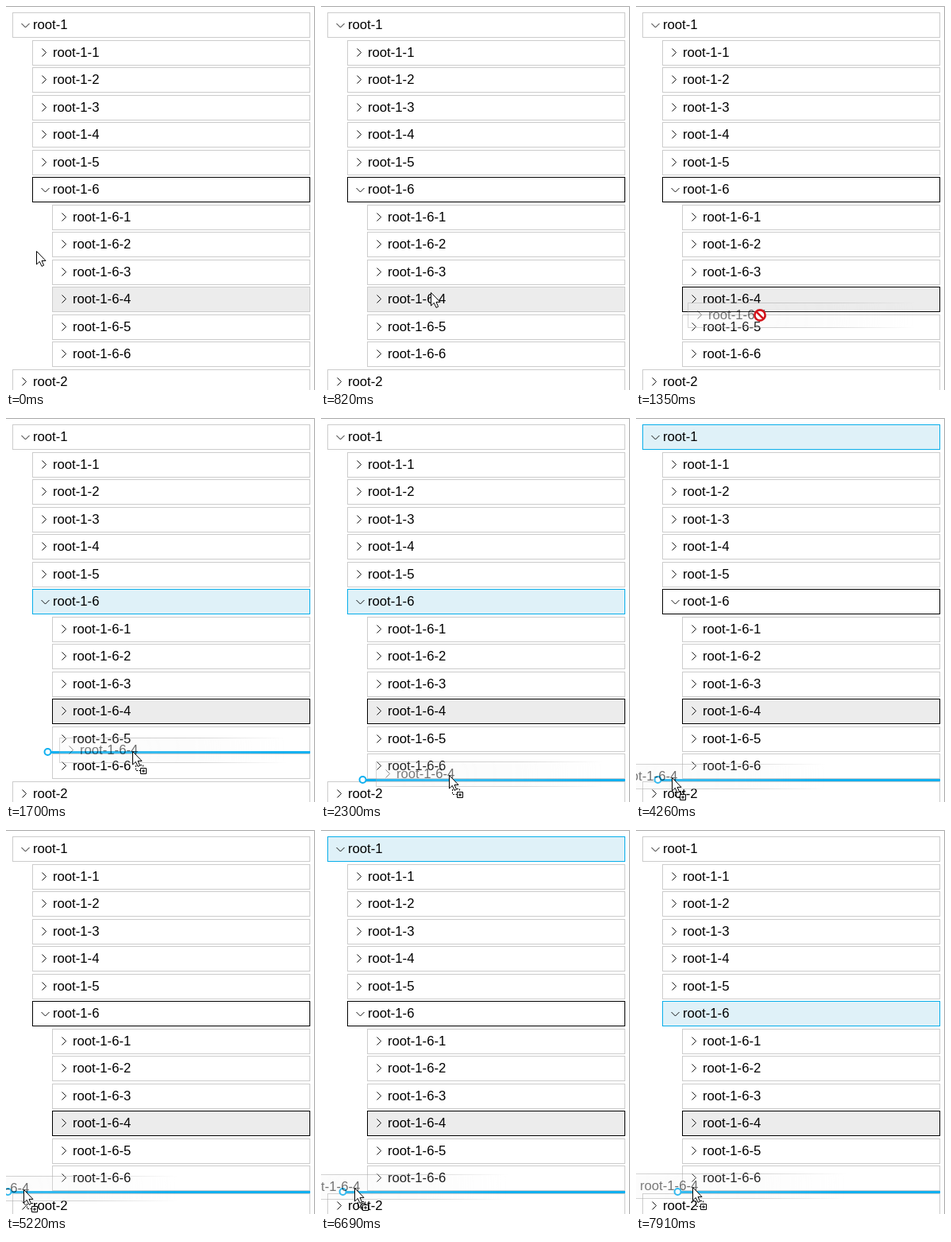
An HTML page that plays this animation: 389 by 483 pixels, repeating every 8 s.

```html
<!DOCTYPE html>
<html lang="en">
<head>
<meta charset="utf-8">
<title>Tree drag and drop</title>
<style>
  html, body { margin: 0; width: 100%; height: 100%; overflow: hidden; background: #fff; }
  svg { display: block; width: 389px; height: 483px; }
  text { font: 16.7px "Liberation Sans", Arial, sans-serif; fill: #000; }
  .row rect { fill: #fff; stroke: #ccc; }
  .row path { fill: none; stroke: #111; }
  .row.picked rect { fill: #ececec; }
  .row.focus rect { stroke: #000; }
  .row.over rect { fill: #dff1f8; stroke: #08aeea; }
  #ghost rect { fill: #ececec; fill-opacity: .3; stroke: #aaa; }
</style>
</head>
<body>
<svg viewBox="0 0 389 483">
  <defs>
    <radialGradient id="fade" gradientUnits="userSpaceOnUse" cx="92" cy="17" r="195">
      <stop offset="0" stop-color="#fff" stop-opacity=".58"/>
      <stop offset=".45" stop-color="#fff" stop-opacity=".48"/>
      <stop offset="1" stop-color="#fff" stop-opacity="0"/>
    </radialGradient>
    <mask id="soft" maskUnits="userSpaceOnUse" x="-5" y="-5" width="340" height="45">
      <rect x="-5" y="-5" width="340" height="45" fill="url(#fade)"/>
    </mask>
  </defs>
  <path d="M0 .5H388.5V483" fill="none" stroke="#a8a8a8"/>
  <g id="tree"></g>
  <g id="drop" stroke="#10b0f0">
    <path id="bar" stroke-width="3"/>
    <circle id="knob" r="4" fill="#fff" stroke-width="2"/>
  </g>
  <g id="ghost" mask="url(#soft)"></g>
  <g id="cursor">
    <g id="arrow">
      <path d="M.5 .5V17L4.3 13.4L7 19.4L9.6 18.2L7 12.4H12Z" fill="#fff" stroke="#000"/>
      <g id="badge" fill="none" stroke="#000">
        <path d="M4.5 18V24.5H10M10 17.5H13.5V20" stroke-dasharray="2 1.5"/>
        <path d="M10.5 21.5H17.5V28.5H10.5Z" fill="#fff"/>
        <path d="M12 25H16M14 23V27"/>
      </g>
    </g>
    <g id="deny" fill="#fff" stroke="#d4141c" stroke-width="2.6">
      <circle cx="-1" cy="-1" r="6.6"/>
      <path d="M-5.6 -5.6L3.6 3.6"/>
    </g>
  </g>
</svg>
<script>
const $ = id => document.getElementById(id);
const LOOP = 8000, PRESS = 870, DRAG = 1110, EDGE = 2300;

const children = parent => [1, 2, 3, 4, 5, 6].map(n => `${parent}-${n}`);
const names = ['root-1', ...children('root-1'), ...children('root-1-6'), 'root-2'];
const open = ['root-1', 'root-1-6'];
const dragged = 'root-1-6-4';

function row(name, x, y) {
  const chevron = open.includes(name) ? 'm11.5 14l5 5l5-5' : 'm12.5 10.5l5 5l-5 5';
  return `<g class="row" data-name="${name}">
    <rect x="${x + .5}" y="${y + .5}" width="${382 - x}" height="31"/>
    <path d="M${x} ${y}${chevron}"/>
    <text x="${x + 26}" y="${y + 21}">${name}</text></g>`;
}

$('tree').innerHTML = names.map((name, i) =>
  row(name, 8 + 25 * (name.split('-').length - 2), Math.round(8 + 34.5 * i))).join('');
$('ghost').innerHTML = row(dragged, 0, 0);
$('ghost').querySelector('rect').setAttribute('width', 324);
const rows = [...$('tree').children];

// Pointer moves: start, end, x, y; it rests in between
const moves = [
  [180, 930, 155, 369], [DRAG, 2050, 161, 449], [2600, 3430, 71, 452], [3430, 4070, 45, 452],
  [4260, 5220, 22, 452], [6090, 6690, 42, 450], [7370, 7910, 71, 449]
];

function pointer(t) {
  let x = 38, y = 308;
  for (const [start, end, toX, toY] of moves) {
    const k = Math.min(1, Math.max(0, (t - start) / (end - start)));
    x += (toX - x) * k;
    y += (toY - y) * k;
  }
  return [Math.round(x), Math.round(y)];
}

// Which row is highlighted, and where the insertion line lies
function target(t, x, y) {
  if (t < DRAG) return {};
  if (t >= EDGE) {
    if (x >= 58) return { over: 'root-1-6', knob: 52, y: 455.5 };
    if (x >= 33) return { over: 'root-1', knob: 27, y: 455.5 };
    return { knob: 2, y: 455.5 };
  }
  if (y < 395) return { denied: true };
  if (y < 412) return { over: 'root-1-6-5' };
  if (y < 428) return { over: 'root-1-6', knob: 52, y: 420.5 };
  return { over: 'root-1-6-6' };
}

const show = (id, on) => $(id).style.display = on ? '' : 'none';
const move = (id, x, y) => $(id).setAttribute('transform', `translate(${x} ${y})`);

function draw(now) {
  const t = now % LOOP, [x, y] = pointer(t), hit = target(t, x, y);
  for (const el of rows) {
    const name = el.dataset.name, picked = name === dragged;
    el.classList.toggle('picked', picked);
    el.classList.toggle('focus', name === 'root-1-6' || picked && t >= PRESS);
    el.classList.toggle('over', name === hit.over);
  }
  show('drop', hit.y);
  if (hit.y) {
    $('bar').setAttribute('d', `M${hit.knob + 4} ${hit.y}H383`);
    $('knob').setAttribute('cx', hit.knob + .5);
    $('knob').setAttribute('cy', hit.y - .5);
  }
  show('ghost', t >= DRAG);
  move('ghost', x - 92, y - 17);
  show('arrow', !hit.denied);
  show('deny', hit.denied);
  show('badge', t >= DRAG);
  move('cursor', x, y);
  requestAnimationFrame(draw);
}
requestAnimationFrame(draw);
</script>
</body>
</html>
```
